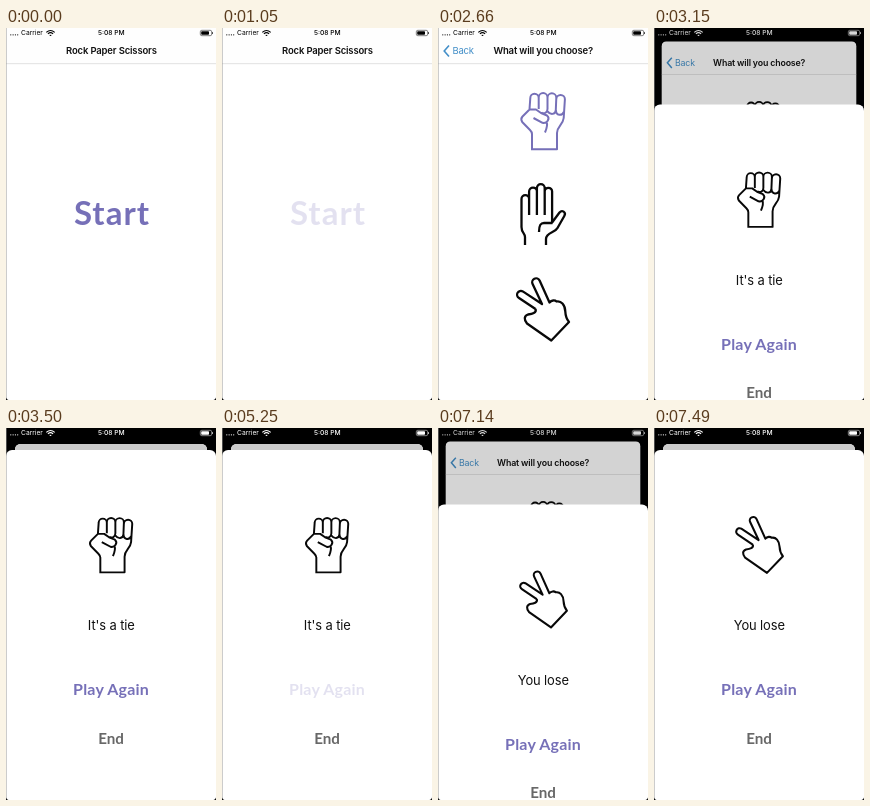
An HTML page that plays this animation: 210 px wide and 372 px high, repeating every 8000 ms.

```html
<!DOCTYPE html>
<html lang="en">
<head>
<meta charset="utf-8">
<title>Rock Paper Scissors</title>
<style>
  html, body { margin: 0; width: 100%; height: 100%; overflow: hidden; background: #000; }
  svg { display: block; width: 100vw; height: 100vh; }
  text { font-family: Inter, Roboto, sans-serif; }
  .title { font-size: 9.5px; font-weight: 600; letter-spacing: -.16px; fill: #111; }
  .back { font-size: 9.5px; letter-spacing: -.2px; fill: #438fc8; }
  .status { font-size: 6.7px; }
  .result { font-size: 12.9px; letter-spacing: -.1px; fill: #111; }
  .marker { font-family: Lato, "Open Sans", sans-serif; font-weight: 700; fill: #7670b8; }
  .mid { text-anchor: middle; }
  .icon { fill: none; stroke: #080808; stroke-width: 2.3; stroke-linejoin: round; }
</style>
</head>
<body>
<svg viewBox="0 0 210 372" xmlns="http://www.w3.org/2000/svg">
  <defs>
    <path id="rock" stroke-width="2" d="M94 121.200V106C94 104 93 103 92 102L84.200 94C83 92 83 90 84.500 88.500L91.500 81.500L92.300 70A4.200 4.200 0 0 1 100.700 70V81
      M100.700 75V69.500A4.400 4.400 0 0 1 109.500 69.500V81C109.500 85 106 86 103.500 84.500
      M109.500 69.700A4.400 4.400 0 0 1 118.300 69.700L117.800 82C117.500 87 112 87 109.300 83
      M118.300 71.200A4.300 4.300 0 0 1 126.900 71.200L125.700 90C125 97 119 98 119 105V121.200H93
      M117.900 82C118 88 124 88 125.800 84
      M91.500 81.500H98L103 85L109 87.500C112.500 90.500 109 96 104.500 94.800L95.500 90
      M108.500 94C110 97 108.500 101 107 104.500"/>
    <path id="paper" d="M87 217V209C87 205 83.500 205 83.500 199V171A3.800 3.800 0 0 1 91.100 171V187
      M91.100 172V163.500A3.900 3.900 0 0 1 98.900 163.500V187
      M98.900 164V160A3.900 3.900 0 0 1 106.700 160V187
      M106.700 166V163.500A3.700 3.700 0 0 1 114.100 163.500V194.500L121.500 184.500C124 181.500 128.500 184 126.300 188L119.500 200C117 205 108 204 108 211V217
      M114.500 195H106C102.500 195 101 197 101 204"/>
    <path id="scissors" d="M97.500 281L81 270A3.800 3.800 0 0 1 84.800 263.400L104 276L94.600 256A3.900 3.900 0 0 1 101.600 252.500L111.500 274.500
      C113.500 272 117 272 118.500 273.500C123 272.500 127 276.500 127.300 283.500C127.500 288 128.500 291 131 294L113.300 312.500L89 295.500
      C85.800 291.500 86 288 90 286.500C94 286 99 285 97.500 281"/>
  </defs>

  <rect width="210" height="372"/>
  <g id="app">
    <clipPath id="card"><rect id="cardShape" width="210" height="372"/></clipPath>
    <g clip-path="url(#card)">
      <rect width="210" height="372" fill="#fff"/>
      <g id="startPage">
        <text id="start" class="marker mid" x="106" y="197" font-size="33" letter-spacing="1">Start</text>
      </g>
      <rect id="pushDim" y="36" width="210" height="336"/>
      <g id="choosePage">
        <rect y="36" width="210" height="336" fill="#fff"/>
        <use id="rockPick" class="icon" href="#rock"/>
        <use id="paperPick" class="icon" href="#paper"/>
        <use class="icon" href="#scissors"/>
      </g>
      <rect width="210" height="36" fill="#fefefe"/>
      <rect y="35.500" width="210" height=".6" fill="#d0d0d0"/>
      <text id="oldTitle" class="title" y="26">Rock Paper Scissors</text>
      <text id="newTitle" class="title mid" y="26">What will you choose?</text>
      <path id="chevron" d="M11 17.500L6.200 23L11 28.500" fill="none" stroke="#438fc8" stroke-width="1.600"/>
      <text id="back" class="back" y="26.200">Back</text>
      <rect id="sheetDim" width="210" height="372"/>
    </g>
  </g>

  <g id="sheet">
    <path d="M0 372V6A6 6 0 0 1 6 0H204A6 6 0 0 1 210 6V372Z" fill="#fff"/>
    <g id="tieIcon" transform="translate(105 95) scale(.97) translate(-105 -93)"><use class="icon" href="#rock"/></g>
    <g id="loseIcon" transform="translate(105.500 95) scale(.9) translate(-105 -281.500)"><use class="icon" href="#scissors"/></g>
    <text id="result" class="result mid" x="105.300" y="180"></text>
    <text id="again" class="marker mid" x="105" y="245" font-size="16" letter-spacing=".2">Play Again</text>
    <text class="marker mid" x="105" y="293.500" font-size="15.200" style="fill:#686868">End</text>
  </g>

  <g id="statusBar">
    <g id="signal"></g>
    <text class="status" x="15" y="7.400">Carrier</text>
    <g fill="none" stroke="currentColor" stroke-width="1.100">
      <path d="M40.300 4.300Q44.500 .6 48.700 4.300M41.900 5.900Q44.500 3.500 47.100 5.900"/>
      <path d="M43.700 7.400H45.300"/>
    </g>
    <text class="status mid" x="105.300" y="7.400" font-weight="500">5:08 PM</text>
    <rect x="194.300" y="2.300" width="11.400" height="5.400" rx="1.500" fill="none" stroke="currentColor" stroke-width=".5"/>
    <rect x="195.200" y="3.200" width="7.800" height="3.600" rx=".8"/>
    <rect x="206.300" y="4" width=".7" height="2" rx=".3"/>
  </g>
  <rect width=".5" height="372" fill="#999"/>
  <path d="M0 372V369.500Q.5 371.500 2.500 372ZM210 372V369.500Q209.500 371.500 207.500 372Z"/>
</svg>
<script>
const LOOP = 8000, STEP = 70, W = 210, H = 372, SHEET_TOP = 22;
const PURPLE = '#7670b8', INK = '#080808';
const el = id => document.getElementById(id);
const set = (id, attrs) => {
  for (const name in attrs) el(id).setAttribute(name, attrs[name]);
};
const within = (t, from, to) => t >= from && t < to;
const mix = (a, b, p) => a + (b - a) * p;

// Critically damped spring; motion is already under way at the first visible step.
function spring(t, begin, end) {
  if (t < begin) return 0;
  if (t >= end) return 1;
  const x = 18.26 * (t - begin + 42) / 1000;
  return 1 - (1 + x) * Math.exp(-x);
}

function drawPush(p) {
  set('startPage', { transform: `translate(${-0.3 * W * p})` });
  set('pushDim', { opacity: 0.09 * p });
  set('choosePage', { transform: `translate(${W * (1 - p)})` });
  set('oldTitle', { x: mix(60, 14.4, p), opacity: 1 - p });
  set('newTitle', { x: mix(259, 105.2, p), opacity: p });
  set('back', { x: mix(60, 14.4, p), opacity: p });
  set('chevron', { opacity: p });
}

function drawSheet(p) {
  const scale = mix(1, 0.914, p);
  set('app', { transform: `translate(${W / 2 * (1 - scale)} ${16 * p}) scale(${scale})` });
  set('cardShape', { rx: 6 * p });
  set('sheetDim', { opacity: 0.2 * p });
  set('sheet', { transform: `translate(0 ${mix(H, SHEET_TOP, p)})` });
  const shade = Math.round(255 * p), color = `rgb(${shade},${shade},${shade})`;
  set('statusBar', { fill: color, color });
}

function render(time) {
  const t = Math.floor((time % LOOP) / STEP + 1e-6) * STEP;
  const lost = t >= 7000;
  drawPush(spring(t, 1190, 1680));
  drawSheet(lost ? spring(t, 7000, 7490)
                 : spring(t, 3010, 3500) - spring(t, 5740, 6020));
  set('start', { opacity: within(t, 1050, 1190) ? 0.2 : 1 });
  set('again', { opacity: within(t, 5250, 5740) ? 0.2 : 1 });
  el('rockPick').style.stroke = within(t, 2660, 3010) ? PURPLE : INK;
  el('paperPick').style.stroke = within(t, 6790, 6860) ? PURPLE : INK;
  set('tieIcon', { visibility: lost ? 'hidden' : 'visible' });
  set('loseIcon', { visibility: lost ? 'visible' : 'hidden' });
  el('result').textContent = lost ? 'You lose' : "It's a tie";
}

el('signal').innerHTML = [0, 1, 2, 3]
  .map(i => `<circle cx="${4.8 + 2.3 * i}" cy="6.800" r=".6"/>`).join('');

function tick() {
  render(performance.now());
  requestAnimationFrame(tick);
}
tick();
</script>
</body>
</html>
```
